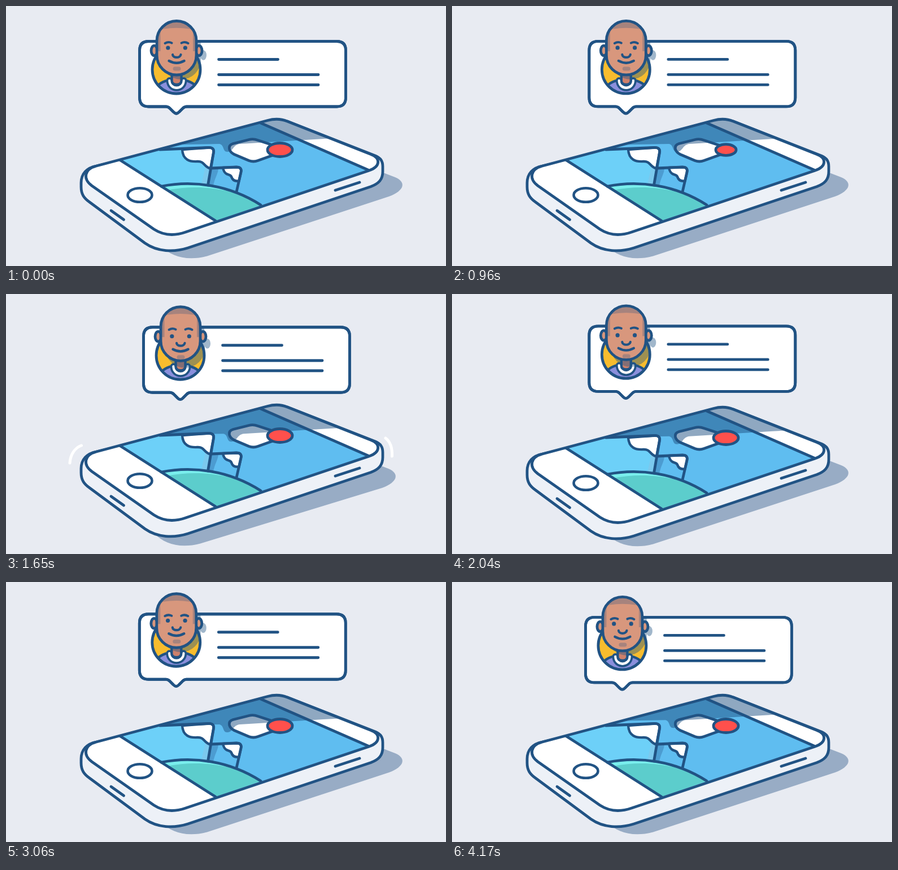
An HTML page with a canvas that plays this animation: 779x460 px, repeating every 4200 ms.

```html
<!DOCTYPE html>
<html lang="en">
<head>
<meta charset="utf-8">
<title>Message on a phone</title>
<style>
html, body { margin: 0; width: 100%; height: 100%; overflow: hidden; background: #e8ebf2; }
canvas { display: block; width: 779px; height: 460px; }
</style>
</head>
<body>
<canvas id="stage"></canvas>
<script>
const W = 779, H = 460, LOOP = 4200;
const NAVY = '#215384', SKIN = '#d8977d', HAIR = '#a7837d', WHITE = '#ffffff';
const SHADE = 'rgba(33,83,132,0.5)';
const canvas = document.getElementById('stage');
const ctx = canvas.getContext('2d');
const dpr = window.devicePixelRatio || 1;
canvas.width = W * dpr;
canvas.height = H * dpr;

const path = d => new Path2D(d);
const oval = (x, y, rx, ry) => {
  const p = new Path2D();
  p.ellipse(x, y, rx, ry, 0, 0, Math.PI * 2);
  return p;
};

const phone = {
  body: path('M160 283 C143 286 133 297 133 313 V320 C133 333 138 340 148 347 L246 419.500 C268 435 297 436 322 428 L646 319.500 C660 314 667 307 667 293 V284 C667 274 663 269 654 265 L498 204 Z'),
  face: path('M160 283 L463 202.500 C476 199 486 199 498 204 L645 262 C664 269 663 284 643 291 L318 400 C298 407 279 406 262 395 L152 318 C136 306 138 289 160 283 Z'),
  screen: path('M201 272 L451 206 L641 290 L371 380 Z'),
  edges: path('M201 272 L371 380 M451 207 L641 290'),
  slots: path('M186 362 L208.500 378 M583 326 L626 312'),
  home: oval(237, 334.5, 21.5, 12.3)
};
const scene = {
  big: path('M190 268 L272 254 L358 250.500 Q369 250 368 258 L357 318 L371 380 H200 Z'),
  bigSide: path('M353 284 L362 287 L357 317 L346 315 Z'),
  bigLine: path('M272 254 L358 250.500 Q369 250 367.500 259 L357.500 317'),
  snow: path('M312 254 L358 250.500 Q369 250 367.500 259 L362 287.500 C350 285 352 274.500 339 275 C325 276 313 272 312 254 Z'),
  gap: path('M362 287 L376 288 C375 298 369 306 367 318 L357 318 Z'),
  smallLine: path('M362 287 L408 285 Q418 285 416 294 L408 329'),
  smallSnow: path('M384 286 L408 285 Q418 285 416 294 L412.500 309.500 C405 310.500 401 308 399.500 303 C398 298 394 299 390.500 297 C387 295 385 292 384 286 Z'),
  hill: path('M275 319 C330 308 395 316 452 352 L371 380 Z'),
  hillFront: path('M284 326 C325 318 358 320 395 328 Q425 336 452 352 L371 380 Z'),
  hillLine: path('M275 319 C330 308 395 316 451 352'),
  cloud: path('M402 243.500 L430 236.500 Q438 234.500 446 237.500 L478 248 V262 L446 273.500 Q438 276.500 430 273.500 L404 262.500 Q397 259 395.500 253 Q394 246 402 243.500 Z')
};
const bubble = path('M252.500 62.500 H585.500 Q601.500 62.500 601.500 78.500 V162 Q601.500 178 585.500 178 H320 Q316 178 313 181 L306.500 187.500 Q301.500 193 296.500 187.500 L290 181 Q287 178 283 178 H252.500 Q236.500 178 236.500 162 V78.500 Q236.500 62.500 252.500 62.500 Z');
const textLines = path('M376.500 94.500 H481.500 M376.500 121.500 H553 M376.500 139.500 H553');
const cast = path('M255 246 L378 244 C387 246 383 258 392 258 C402 258 402 245 414 244 L562 235 L620 232 V160 H255 Z');

const badge = oval(301.5, 112.5, 42.5, 42.5);
const shirt = path('M262 152 Q270 132 293 131 H311 Q334 132 342 152 V162 H262 Z');
const collar = path('M289.500 132 C290 149 314 149 314.500 132');
const neck = path('M293.500 112 V132 Q293.500 139 302 139 Q310.500 139 310.500 132 V112 Z');
const head = path('M267 61.500 A35 35 0 0 1 337 61.500 V87 A35 35 0 0 1 267 87 Z');
const earL = oval(262.5, 79, 5.5, 8.8);
const earR = oval(341.5, 79, 5.5, 8.8);
const hair = path('M260 15 H344 V80 H331 V47 Q331 41 325 40.500 Q302 37 279 40.500 Q273.500 41 273.500 47 V80 H260 Z');
const brows = path('M281.500 66 Q287.500 62.500 293.500 65.500 M310.500 65.500 Q316.500 62.500 322.500 66');
const nose = path('M295 86 C295.500 92.500 308.500 92.500 309.500 86');
const mouth = path('M288.500 97 Q302 104.500 315.500 97');
const goatee = path('M299 107.500 H306 Q309.500 107.500 309.500 111 Q309.500 114.500 306 114.500 H299 Q295.500 114.500 295.500 111 Q295.500 107.500 299 107.500 Z');
const buzzL = path('M133.500 268 C122 272 114 284 113 299');
const buzzR = path('M672 255 C680 261 684 273 683.500 287');

function fill(p, color) {
  ctx.fillStyle = color;
  ctx.fill(p);
}
function line(p, width = 4.8, color = NAVY) {
  ctx.lineWidth = width;
  ctx.strokeStyle = color;
  ctx.stroke(p);
}
function shape(p, color, width) {
  fill(p, color);
  line(p, width);
}
function within(dx, dy, draw) {
  ctx.save();
  ctx.translate(dx, dy);
  draw();
  ctx.restore();
}
function clipped(p, draw) {
  ctx.save();
  ctx.clip(p);
  draw();
  ctx.restore();
}

const ramp = (t, a, b) => {
  const u = Math.min(1, Math.max(0, (t - a) / (b - a)));
  return u * u * (3 - 2 * u);
};
const pulse = (t, a, b, c, d) => ramp(t, a, b) - ramp(t, c, d);

// Cosine that lingers a little at both ends
const swing = (t, peak) => {
  const w = Math.cos((t - peak) / LOOP * Math.PI * 2);
  return 1.35 * w - 0.35 * w ** 3;
};

function pose(t) {
  const buzz = Math.min(1, Math.max(0, (t - 1000) / 1040));
  return {
    dx: 3.05 + 4 * swing(t, 1500),
    dy: -2.9 - 3.3 * swing(t, 2575),
    lift: Math.min(1, 1.08 * Math.sin(Math.PI * buzz)),
    spread: buzz,
    glow: pulse(t, 1010, 1180, 1780, 2020),
    nod: 4.5 * pulse(t, 1000, 1400, 2250, 2800),
    press: pulse(t, 820, 960, 980, 1120),
    blink: pulse(t, 3560, 3630, 3690, 3770)
  };
}

function drawGroundShadow(k) {
  const x = -12 * k, a = -k, b = 6 * k;
  ctx.beginPath();
  ctx.moveTo(275 + x, 425 + a);
  ctx.bezierCurveTo(292 + x, 443 + a, 320 + x, 452 + a, 356 + x, 442.5 + a);
  ctx.lineTo(678 + x, 337 + b);
  ctx.bezierCurveTo(707 + x, 326 + b, 708 + x, 311 + b, 689 + x, 303 + b);
  ctx.lineTo(650 + x, 288 + b);
  ctx.closePath();
  ctx.fillStyle = '#98acc5';
  ctx.fill();
}

function drawPhone(p) {
  const up = -4 * p.lift;
  within(0, up, () => {
    shape(phone.body, '#edf1f7');
    fill(phone.face, WHITE);
    clipped(phone.face, () => {
      clipped(phone.screen, () => {
        fill(phone.screen, '#5fbdf0');
        fill(scene.big, '#6dd0f8');
        fill(scene.bigSide, '#7bc9ee');
        fill(scene.gap, '#4c9cd1');
        fill(scene.snow, WHITE);
        fill(scene.smallSnow, WHITE);
        fill(scene.hill, '#79eeed');
        fill(scene.hillFront, '#5ccdcc');
      });
      fill(scene.cloud, WHITE);
      within(p.dx, -1.4 * p.dy - up / 2, () => fill(cast, SHADE));
      line(scene.snow, 4.4);
      line(scene.bigLine);
      line(scene.smallSnow, 4.4);
      line(scene.smallLine);
      line(scene.hillLine);
      line(phone.edges);
    });
    line(scene.cloud);
    const s = 1 - 0.18 * p.press;
    shape(oval(485, 254.5, 22 * s, 12 * s), '#ff504c');
    line(phone.face);
    shape(phone.home, WHITE, 4.6);
    line(phone.slots);
  });
}

function drawBuzz(p) {
  if (p.glow <= 0) return;
  const out = 5 * (p.spread - 0.625);
  ctx.globalAlpha = p.glow;
  within(-out, -out * 0.5, () => line(buzzL, 5, WHITE));
  within(out, -out * 0.5, () => line(buzzR, 5, WHITE));
  ctx.globalAlpha = 1;
}

function drawFace(p) {
  shape(earL, SKIN);
  shape(earR, SKIN);
  fill(head, SKIN);
  clipped(head, () => {
    fill(hair, HAIR);
    within(0, p.nod, () => fill(goatee, HAIR));
  });
  line(head);
  within(0, p.nod * 0.2, () => line(brows, 4));
  within(0, p.nod, () => {
    const ry = 3.6 - 3 * p.blink;
    for (const x of [286.8, 317.3]) {
      fill(oval(x, 74 + 0.8 * p.blink, 3.6 + p.blink, ry), p.blink > 0.9 ? '#806f7c' : NAVY);
    }
    line(nose, 4.2);
    line(mouth, 4.4);
  });
}

function drawMessage(p) {
  within(p.dx, p.dy, () => {
    shape(bubble, WHITE);
    line(textLines);
    fill(badge, '#f7bc2e');
    clipped(badge, () => {
      shape(shirt, '#8a8fdc', 4.4);
      line(collar, 12);
      line(collar, 4.5, WHITE);
      shape(neck, '#cd806b', 4.4);
    });
    clipped(bubble, () => {
      const shadow = new Path2D();
      for (const part of [head, earR]) shadow.addPath(part);
      within(8, 8 + p.nod, () => fill(shadow, 'rgba(33,83,132,0.42)'));
    });
    line(bubble);
    line(badge);
    drawFace(p);
  });
}

function draw(now) {
  const p = pose(now % LOOP);
  ctx.setTransform(dpr, 0, 0, dpr, 0, 0);
  ctx.lineCap = ctx.lineJoin = 'round';
  ctx.fillStyle = '#e8ebf2';
  ctx.fillRect(0, 0, W, H);
  drawGroundShadow(p.lift);
  drawPhone(p);
  drawBuzz(p);
  drawMessage(p);
}

const start = performance.now();
function tick() {
  draw(performance.now() - start);
  requestAnimationFrame(tick);
}
tick();
</script>
</body>
</html>
```
